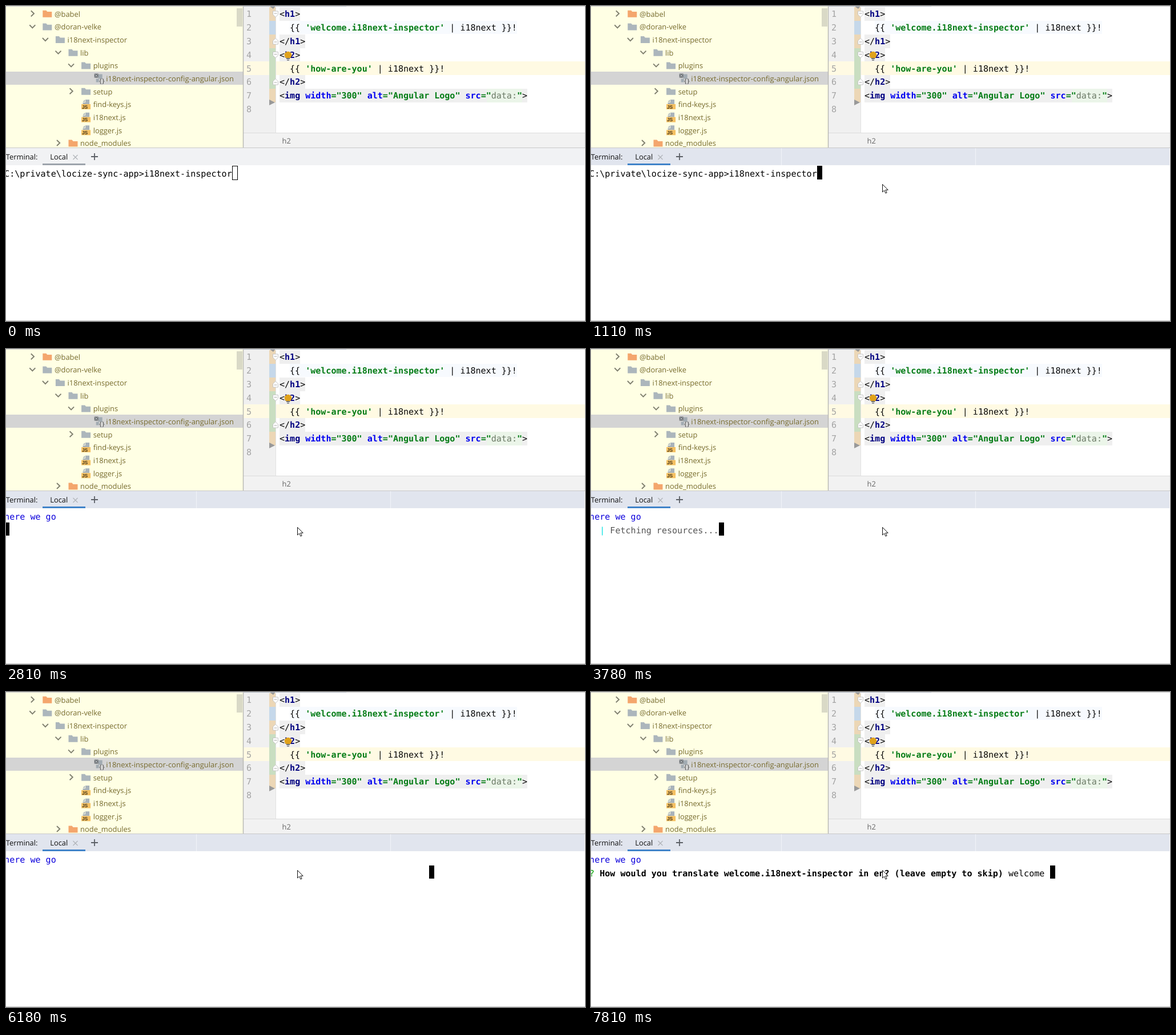
An HTML page for the animation above (8 s loop, 1014 by 552 pixels).

```html
<!DOCTYPE html>
<html lang="en">
<head>
<meta charset="utf-8">
<title>Terminal session</title>
<style>
  html, body { margin: 0; width: 100%; height: 100%; overflow: hidden; background: #fff; }
  svg { display: block; width: 1014px; height: 552px; }
  text { white-space: pre; text-rendering: geometricPrecision; }
  .ui { font: 12.9px "Open Sans", "Noto Sans", sans-serif; }
  .code { font: 15.02px "DejaVu Sans Mono", monospace; fill: #080808; }
  .term { font: 15.065px "DejaVu Sans Mono", monospace; fill: #000; }
  .tree { fill: #776b2e; }
  .num { fill: #a3a3a3; }
  .tag, .attr, .str, .bold { font-weight: bold; }
  .tag { fill: #000080; }
  .attr { fill: #0000f0; }
  .str { fill: #067d17; }
  .fold { fill: #6b7a66; }
  .blue { fill: #0c00dc; }
  .cyan { fill: #00e0e0; }
  .dim { fill: #555; }
  .ask { fill: #00a000; }
  .chev { fill: none; stroke: #808070; stroke-width: 1.9; }
</style>
</head>
<body>
<svg viewBox="0 0 1014 552">
  <defs>
    <path id="dir" d="M0 1h6l2 2.4h8V13H0z"/>
    <path id="right" class="chev" d="M-2.5-5 2.7 0-2.5 5"/>
    <path id="down" class="chev" d="M-5-2.6 0 2.5 5-2.6"/>
    <g id="js">
      <path d="M7 0h7v8H2.500V5H7z" fill="#a9b3ba"/>
      <path d="M6 0v4H2.500z" fill="#a9b3ba"/>
      <path d="M0 8h16v9H0z" fill="#f5c062"/>
      <text x="0.800" y="15.800" font-family="Liberation Sans, sans-serif" font-size="8.500" font-weight="bold" fill="#4a3c20">JS</text>
    </g>
    <g id="json">
      <path d="M7 1h7v8H8v6H3V9h4z" fill="#a2abb2"/>
      <path d="M0 0h7v7H0z" fill="#686d71"/>
      <path d="M1 1l5 5M6 1 1 6" stroke="#c6cacd"/>
      <text x="7.500" y="16" font-family="DejaVu Sans Mono, monospace" font-size="10" letter-spacing="-0.700" fill="#444">{}</text>
    </g>
    <g id="foldDown">
      <path d="M-4.500-5h9v6L0 5.500-4.500 1z" fill="#fff" stroke="#c5c5c5"/>
      <path d="M-2.500-1h5" stroke="#aaa"/>
    </g>
    <clipPath id="treeClip"><path d="M0 0h400v248H0z"/></clipPath>
  </defs>

  <!-- project tree -->
  <path d="M0 0h415v248H0z" fill="#ffffe4"/>
  <path d="M0 115h415v23H0z" fill="#d4d4d4"/>
  <path d="M404 4h10v32h-10z" fill="#d9d9c6"/>
  <g id="tree" class="ui tree" clip-path="url(#treeClip)"></g>

  <!-- editor -->
  <path d="M416 0h56v222h-56z" fill="#f0f0f0"/>
  <path d="M416 97h598v24H416z" fill="#fffae3"/>
  <path d="M461 2h11v24h-11zm0 48h11v24h-11zm0 95h11v24h-11z" fill="#ecd7b6"/>
  <path d="M461 26h11v24h-11z" fill="#c5d8ea"/>
  <path d="M461 74h11v71h-11z" fill="#c9dec1"/>
  <path d="M461 164 471 169 461 174zM461 0h11l-4 5z" fill="#999"/>
  <path d="M472.500 2v220" stroke="#e2e2e2"/>
  <path d="M497 26h398v23H497z" fill="#f7fafe"/>
  <path d="M479 2h36v24h-36zm0 48h45v24h-45zm0 24h36v23h-36zm0 47h45v24h-45zm0 24h434v24H479z" fill="#efefef"/>
  <path d="M842 145h62v24h-62z" fill="#ebf5e9"/>
  <g id="editor" class="code"></g>
  <use href="#foldDown" x="472" y="14"/>
  <use href="#foldDown" x="472" y="85.500"/>
  <use href="#foldDown" transform="translate(472 62) scale(1 -1)"/>
  <use href="#foldDown" transform="translate(472 133) scale(1 -1)"/>
  <circle cx="494" cy="86" r="6.300" fill="#e0a21b"/>
  <path d="M491 91h6v2h-6zm1 3h4v1.500h-4z" fill="#6e6e6e"/>
  <path d="M416 222h598v26H416z" fill="#f2f2f2"/>
  <path d="M416 222.500h598" stroke="#dcdcdc"/>
  <text class="ui" x="483.500" y="241" fill="#666">h2</text>
  <path d="M415.500 0v248" stroke="#b9b9b4" stroke-width="1.500"/>
  <path d="M0 .5h1014" stroke="#d0d0d0"/>
  <path d="M416 .5h180" stroke="#b4bbc4"/>

  <!-- terminal header -->
  <path id="bar" d="M0 249h1013v30H0z"/>
  <path d="M0 248.500h1014" stroke="#c9c9c9"/>
  <path id="seams" d="M333.500 249v30M673.500 249v30" stroke="#f0f3f8"/>
  <path id="underline" d="M64 276h75v3H64z"/>
  <g class="ui" fill="#111">
    <text x="-0.300" y="269">Terminal:</text>
    <text x="77.200" y="269">Local</text>
  </g>
  <path d="M117.500 261l8 8m0-8-8 8" stroke="#b0b3b8" stroke-width="1.200"/>
  <path d="M149 264h12M155 258v12" stroke="#5c6066" stroke-width="1.800"/>

  <!-- terminal -->
  <path d="M0 551.500h1014" stroke="#c6c6c6"/>
  <text id="row0" class="term" x="-2.900" y="299.300"></text>
  <text id="row1" class="term" x="-2.900" y="322.800"></text>
  <rect id="caret"/>
  <path id="mouse" d="M.5.5v13.500l3.200-2.900 2.200 5 2.200-1-2.200-4.800h4.300z" fill="#fff" stroke="#111"/>
</svg>
<script>
const $ = id => document.getElementById(id);
const span = (cls, s) => `<tspan class="${cls}">${s}</tspan>`;

// label, depth, icon, chevron
const nodes = [
  ['@babel', 0, 'lib', 'right'],
  ['@doran-velke', 0, 'dir', 'down'],
  ['i18next-inspector', 1, 'dir', 'down'],
  ['lib', 2, 'dir', 'down'],
  ['plugins', 3, 'dir', 'down'],
  ['i18next-inspector-config-angular.json', 4, 'json'],
  ['setup', 3, 'dir', 'right'],
  ['find-keys.js', 3, 'js'],
  ['i18next.js', 3, 'js'],
  ['logger.js', 3, 'js'],
  ['node_modules', 2, 'lib', 'right'],
];
$('tree').innerHTML = nodes.map(([label, depth, icon, chev], i) => {
  const y = 13.7 + i * 22.68, x = 64.3 + depth * 22.6;
  const isDir = icon === 'dir' || icon === 'lib';
  const fill = icon === 'lib' ? '#f4a66d' : '#acb6bc';
  return (chev ? `<use href="#${chev}" x="${x - 18}" y="${y - 0.5}"/>` : '') +
    `<use href="#${isDir ? 'dir' : icon}" x="${x}" y="${y - (isDir ? 7 : 8.5)}" fill="${fill}"/>` +
    `<text x="${x + 20.6}" y="${y + 4.9}">${label}</text>`;
}).join('');

const open = name => '&lt;' + span('tag', name) + '&gt;';
const close = name => '&lt;/' + span('tag', name) + '&gt;';
const pipe = key => `  {{ ${span('str', `'${key}'`)} | i18next }}!`;
const attr = (name, value) => ' ' + span('attr', name) + span('str', '=' + value);
const lines = [
  open('h1'), pipe('welcome.i18next-inspector'), close('h1'),
  open('h2'), pipe('how-are-you'), close('h2'),
  '&lt;' + span('tag', 'img') + attr('width', '"300"') + attr('alt', '"Angular Logo"') +
    attr('src', '"') + span('fold', 'data:') + span('str', '"') + '&gt;',
  '',
];
$('editor').innerHTML = lines.map((line, i) => {
  const y = 19.3 + i * 23.8;
  return `<text class="num" x="421" y="${y}">${i + 1}</text><text x="479" y="${y}">${line}</text>`;
}).join('');

const LOOP = 8000, COL = 9.07, LEFT = -2.9;
const command = 'C:\\private\\locize-sync-app&gt;i18next-inspector';
const greeting = span('blue', 'here we go');
const question = span('ask', '?') +
  span('bold', ' How would you translate welcome.i18next-inspector in en? (leave empty to skip) ');
const ASK_END = 81;

// Each step: start time, second row, caret column (-1 hides it), caret row
const steps = [[0, '', 44, 0], [2040, '', -1, 0], [2120, '', 0, 1]];
const add = (t, text, col) => steps.push([t, text, col, 1]);
const typed = (t, s, shown = true) => add(t, question + s, shown ? ASK_END + s.length : -1);

[2980, 3060, 3130, 3210, 3290, 3360, 3520, 3600, 3690, 3780].forEach((t, i) =>
  add(t, '  ' + span('cyan', '\\|/-'[i % 4]) + span('dim', ' Fetching resources...'), 25));
add(3840, '', 0);
[3910, 4380, 4920, 5400, 5940].forEach((t, i) => typed(t, '', i % 2 === 0));
typed(6090, 'w');
add(6180, '', ASK_END + 1);
typed(6260, 'we');
typed(6330, 'wel');
typed(6870, 'wel', false);
typed(6960, 'welc');
typed(7050, 'welco');
typed(7500, 'welcom');
typed(7730, 'welcome');
typed(7810, 'welcome ');

function put(id, attrs) {
  for (const k in attrs) $(id).setAttribute(k, attrs[k]);
}
function setRow(id, html) {
  const el = $(id);
  if (el.shown !== html) el.innerHTML = el.shown = html;
}

function drawCaret(col, row, solid) {
  const inset = solid ? 0 : 0.5;
  put('caret', {
    x: Math.round(LEFT + col * COL) + inset, y: (row ? 304 : 280) + inset,
    width: solid ? 9 : 9, height: row ? 23 : 24,
    fill: solid ? '#000' : 'none', stroke: solid ? 'none' : '#000',
    visibility: col < 0 ? 'hidden' : 'visible',
  });
}

function drawMouse(t) {
  const p = Math.min(7, Math.floor((t - 240) / 91.4)) / 7;
  const rest = (1 - p) ** 2;
  put('mouse', {
    visibility: t < 240 ? 'hidden' : 'visible',
    transform: `translate(${Math.round(510 + 185 * rest)} ${Math.round(312 + 151 * rest)})`,
  });
}

function render(t) {
  const active = t >= 1040;
  put('bar', { fill: active ? '#e1e5ee' : '#f1f2f4' });
  put('seams', { visibility: active ? 'visible' : 'hidden' });
  put('underline', { fill: active ? '#4083c9' : '#9da4ac' });
  const [, text, col, row] = steps.findLast(s => s[0] <= t);
  setRow('row0', t < 2810 ? command : greeting);
  setRow('row1', text);
  drawCaret(col, row, t >= 1110);
  drawMouse(t);
}

const start = performance.now();
function tick() {
  render((performance.now() - start) % LOOP);
  requestAnimationFrame(tick);
}
tick();
</script>
</body>
</html>
```
